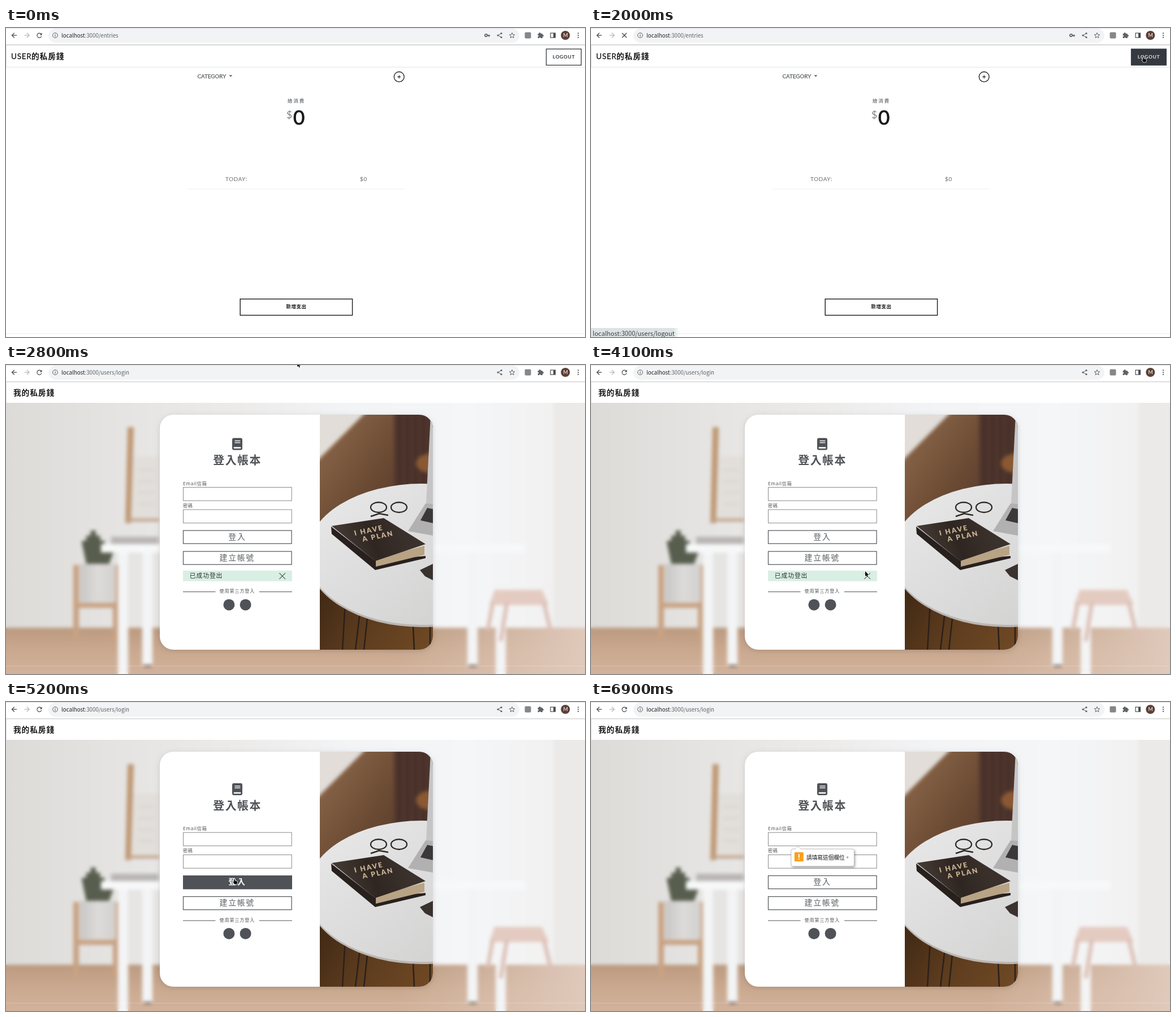
An HTML page with a canvas that plays this animation: 1024x547 px, repeating every 7 s.

```html
<!DOCTYPE html>
<html lang="zh-Hant">
<head>
<meta charset="utf-8">
<title>私房錢</title>
<style>
html, body { margin: 0; width: 100%; height: 100%; overflow: hidden; background: #fff; }
canvas { display: block; }
</style>
</head>
<body>
<canvas id="stage" width="1024" height="547"></canvas>
<script>
const W = 1024, H = 547, LOOP = 7000, TICK = 100;
const CJK = '"Noto Sans CJK TC", "Noto Sans CJK JP", "Noto Sans CJK", sans-serif';
const LATIN = 'Lato, ' + CJK;
const INK = '#4f5256', DARK = '#191919', ICON = '#5f6368';
const screen = document.getElementById('stage').getContext('2d');
let g = screen;

// ---------- drawing helpers ----------
function text(s, x, y, size, color, { w = 400, ls = 0, f = CJK, bold = 0 } = {}) {
  g.font = `${w} ${size}px ${f}`;
  g.letterSpacing = ls + 'px';
  g.fillStyle = color;
  g.fillText(s, x, y);
  if (bold) {
    g.strokeStyle = color;
    g.lineWidth = bold;
    g.strokeText(s, x, y);
  }
  return g.measureText(s).width;
}
function rect(x, y, w, h, c) { g.fillStyle = c; g.fillRect(x, y, w, h); }
function frame(x, y, w, h, c, lw = 1) { g.strokeStyle = c; g.lineWidth = lw; g.strokeRect(x, y, w, h); }
function round(x, y, w, h, r, c) {
  g.beginPath(); g.roundRect(x, y, w, h, r); g.fillStyle = c; g.fill();
}
function trace(pts) {
  g.beginPath();
  for (let i = 0; i < pts.length; i += 2) g.lineTo(pts[i], pts[i + 1]);
}
function poly(c, ...pts) { trace(pts); g.closePath(); g.fillStyle = c; g.fill(); }
function line(c, lw, ...pts) { trace(pts); g.strokeStyle = c; g.lineWidth = lw; g.stroke(); }
function cross(x, y, r, c, lw) {
  line(c, lw, x - r, y - r, x + r, y + r);
  line(c, lw, x - r, y + r, x + r, y - r);
}
function oval(x, y, rx, ry, c) {
  g.beginPath(); g.ellipse(x, y, rx, ry, 0, 0, 7); g.fillStyle = c; g.fill();
}
function ring(x, y, rx, ry, c, lw, from = 0, to = 7) {
  g.beginPath(); g.ellipse(x, y, rx, ry, 0, from, to); g.strokeStyle = c; g.lineWidth = lw; g.stroke();
}
function fade(x0, y0, x1, y1, ...stops) {
  const d = g.createLinearGradient(x0, y0, x1, y1);
  stops.forEach((c, i) => d.addColorStop(i / (stops.length - 1), c));
  return d;
}
function layer(paint) {
  const c = document.createElement('canvas');
  c.width = W; c.height = H;
  g = c.getContext('2d');
  paint();
  g = screen;
  return c;
}
// Sharp copy below keeps the blurred edges opaque.
function soften(pic, r) {
  return layer(() => {
    g.drawImage(pic, 0, 0);
    g.filter = `blur(${r}px)`;
    g.drawImage(pic, 0, 0);
  });
}

// ---------- photographs ----------
const WOOD = '#c8a283';

function table(x, w, legs) {
  rect(x, 317, w, 15, '#f7f8f9');
  for (const [lx, foot] of legs) {
    rect(lx, 332, 18, foot - 332, '#f3f4f5');
    rect(lx + 2, foot - 3, 15, 3, '#5d5049');
  }
}

const room = soften(layer(() => {
  rect(0, 0, W, H, fade(0, 0, W, 0, '#dcdbd8', '#e5e4e2', '#ecebea', '#f3f4f6', '#f5f6f8', '#f0efef'));
  rect(968, 50, 56, 440, '#eceae9');
  rect(0, 465, W, 82, fade(0, 465, 0, H, '#bb9a80', '#caa990', '#d2b29b'));
  rect(700, 465, 324, 82, fade(700, 0, W, 0, '#dfc9ba00', '#dfc9ba'));
  // easel
  rect(222, 162, 49, 112, '#e2dfdb');
  for (let y = 185; y < 260; y += 20) rect(234, y, 28, 1.5, '#cdc8c4');
  poly('#bf9874', 215, 110, 226, 110, 221, 280, 211, 280);
  rect(214, 272, 57, 5, '#bfa087');
  // plant on its stand
  for (let i = -3; i <= 3; i++) {
    line('#585e4e', 9, 162 + i * 5, 354, 162 + i * 8, 293 + 9 * Math.abs(i + 1));
  }
  for (const x of [119, 189]) rect(x, 354, 10, 135, WOOD);
  rect(120, 421, 78, 9, WOOD);
  rect(131, 352, 63, 68, fade(131, 0, 194, 0, '#c8c6c4', '#dddbd9', '#d3d1cf'));
  // desks
  rect(186, 304, 84, 14, '#b9b5b3');
  table(168, 108, [[198, 560], [241, 534]]);
  table(755, 163, [[816, 534], [866, 560]]);
  // stool
  poly('#e4cbc1', 864, 398, 948, 398, 960, 425, 855, 425);
  for (const [x, lean, foot] of [[861, -9, 470], [886, -11, 489], [951, 17, 490]]) {
    line('#dcc0b5', 7, x, 420, x + lean, foot);
  }
}), 3);

const deskBack = soften(layer(() => {
  rect(540, 70, 230, 450, fade(570, 130, 740, 250, '#866347', '#6b4a33', '#50362a'));
  poly('#e2ddd8', 540, 70, 650, 70, 540, 180);
  for (let x = 686; x < 770; x += 14) rect(x, 70, 14, 160, fade(x, 0, x + 14, 0, '#553a30', '#412c26'));
  oval(752, 174, 27, 17, '#8a5933');
  rect(540, 370, 230, 150, fade(555, 390, 740, 504, '#3f2814', '#5d3c1e', '#6e4824'));
}), 3);

const desk = layer(() => {
  g.beginPath(); g.roundRect(272, 88, 483, 416, 24); g.clip();
  g.beginPath(); g.rect(555, 88, 200, 416); g.clip();
  g.drawImage(deskBack, 0, 0);
  for (const [x, lean] of [[600, -5], [628, -10], [642, -9], [718, 4], [750, 0]]) {
    line('#2b211b', 2.5, x, 420, x + lean, 504);
  }
  oval(735, 338, 203, 126, '#bbb6b1');
  oval(735, 335, 203, 125, fade(560, 220, 740, 460, '#e8e8e8', '#dededf', '#d4d4d3'));
  // laptop
  poly('#c6c5c6', 751, 88, 755, 88, 755, 250, 743, 246);
  poly('#b2b1b2', 742, 245, 755, 246, 755, 302, 711, 294);
  poly('#3a3839', 745, 253, 755, 255, 755, 280, 733, 275);
  // glasses
  for (const x of [659, 695]) ring(x, 252, 14, 9, '#2d2926', 2.3);
  line('#2d2926', 2.5, 645, 268, 660, 263, 676, 266);
  // notebook: back cover, pages, front cover
  poly('#27201d', 575, 286, 652, 346, 742, 338, 742, 342, 653, 363, 576, 299);
  poly('#b8a384', 654, 343, 740, 320, 740, 336, 654, 357);
  poly(fade(590, 320, 700, 280, '#453a34', '#2f2622', '#3b312c'), 576, 285, 668, 271, 742, 317, 653, 347);
  g.setTransform(1, -0.2, 0.25, 1, 617, 302);
  text('I HAVE', 0, 0, 12, '#c9b492', { w: 900, f: LATIN, ls: 2 });
  text('A PLAN', 11, 13, 12, '#c9b492', { w: 900, f: LATIN, ls: 2 });
  g.resetTransform();
  poly('#3a322f', 732, 363, 755, 352, 755, 381, 741, 374);
});

// ---------- browser bar ----------
function arrow(x, dir, c) {
  line(c, 1.3, x - 4.3, 13, x + 4.3, 13);
  line(c, 1.3, x, 8.7, x + 4.3 * dir, 13, x, 17.3);
}
function star(x, y) {
  const pts = [];
  for (let i = 0; i < 10; i++) {
    const a = i * Math.PI / 5 - Math.PI / 2, r = i % 2 ? 2.2 : 5;
    pts.push(x + r * Math.cos(a), y + r * Math.sin(a));
  }
  trace(pts); g.closePath();
  g.strokeStyle = ICON; g.lineWidth = 1; g.stroke();
}
function bar(path, loading, key) {
  const c = '#4a4d51';
  rect(0, 0, W, 29, '#fff');
  rect(0, 0, W, 1, '#dfe1e5');
  rect(0, 28.7, W, 1.8, '#d9d9d9');
  round(75, 1, 833, 25, 12.5, '#f1f3f4');
  arrow(14.8, -1, c);
  arrow(36.8, 1, '#b6b8bb');
  if (loading) {
    cross(59, 13, 4, c, 1.4);
  } else {
    ring(59, 13.2, 4, 4, c, 1.3, 0.3, 5.6);
    poly(c, 63.6, 8.4, 63.6, 12.4, 59.6, 12.4);
  }
  ring(87, 13, 4.4, 4.4, ICON, 1);
  rect(86.5, 12.3, 1.1, 3.2, ICON); rect(86.5, 10.4, 1.1, 1.1, ICON);
  const host = text('localhost', 98, 17, 9.72, '#202124');
  text(':3000/' + path, 98 + host, 17, 9.72, ICON);
  if (key) {
    ring(849, 13, 2.1, 2.1, ICON, 1.8);
    rect(851, 12.1, 5, 1.8, ICON); rect(853.3, 13, 1.7, 2.6, ICON);
  }
  line(ICON, 1, 876, 9.5, 870, 13, 876, 16.5);
  for (const y of [9.5, 13, 16.5]) oval(y === 13 ? 870 : 876, y, 1.6, 1.6, ICON);
  star(895, 13.4);
  round(917.5, 7.5, 11, 11, 2, '#85878a');
  round(940.5, 10, 8.5, 8, 1, ICON);
  oval(944, 9.6, 1.7, 1.7, ICON); oval(949.3, 13.6, 1.7, 1.7, ICON);
  oval(940.7, 14, 1.3, 1.3, '#fff'); oval(944.3, 18, 1.3, 1.3, '#fff');
  frame(963, 9, 8.5, 8, c, 1.2); rect(968, 9, 3.5, 8, c);
  oval(989.3, 13, 8, 8, '#5d4037');
  text('M', 985.6, 16.3, 9, '#fff', { f: LATIN });
  for (const y of [9.3, 13, 16.7]) oval(1012, y, 1.1, 1.1, c);
}

// ---------- pages ----------
function entries(hover, status) {
  const grey = '#7b8084';
  rect(0, 0, W, H, '#fff');
  frame(0.5, 30.5, W, 38.8, '#e4e4e4');
  text('USER', 9, 55, 13.5, DARK, { f: LATIN, ls: 0.7, bold: 0.3 });
  text('的私房錢', 45, 55, 13.7, DARK, { w: 700, ls: 0.9 });
  g.globalAlpha = hover;
  rect(955, 37, 63, 29, '#343a40');
  g.globalAlpha = 1;
  frame(955.5, 37.2, 61.8, 28.6, '#343a40', 1.3);
  text('LOGOUT', 967, 54, 8.1, hover ? '#fff' : DARK, { f: LATIN, ls: 1, bold: 0.2 });
  text('CATEGORY', 338.5, 89, 9.8, '#55595c', { f: LATIN, bold: 0.25 });
  poly('#55595c', 394.5, 83.5, 400.3, 83.5, 397.4, 86.6);
  ring(695.2, 86.4, 8.9, 8.9, DARK, 1.3);
  rect(692.2, 85.9, 6, 1.1, DARK); rect(694.7, 83.4, 1.1, 6, DARK);
  text('總消費', 498, 131.5, 8.4, grey, { w: 700, ls: 2 });
  text('$', 496, 159.5, 17.5, grey, { f: LATIN });
  text('0', 508, 171, 35, DARK, { f: LATIN, bold: 0.9 });
  text('TODAY:', 388, 271, 9.8, grey, { f: LATIN, ls: 0.7, bold: 0.2 });
  text('$0', 626, 271, 9.8, grey, { f: LATIN, ls: 0.8, bold: 0.2 });
  rect(321, 284.5, 384, 1, '#f0f0f0');
  frame(414.2, 479.7, 198.4, 28.8, DARK, 1.4);
  text('新增支出', 495.3, 496.3, 8.5, DARK, { w: 700, ls: 0.6 });
  g.setLineDash([2, 1]);
  line('#e2e2e2', 1, 0, 541, W, 541);
  g.setLineDash([]);
  if (status) {
    rect(0, 531, 156, 16, fade(146, 0, 156, 0, '#dde3e5', '#dde3e500'));
    text('localhost:3000/users/logout', 3, 545.3, 11.1, '#3c4043');
  }
}

function button(s, x, y, on) {
  if (on) rect(313, y - 0.5, 193, 24.5, INK);
  else frame(313.5, y, 191.6, 23.2, INK, 1.2);
  text(s, x, y + 15.7, 13.9, on ? '#fff' : '#5d6064', { ls: 1.7, w: on ? 700 : 400 });
}

function tooltip() {
  g.save();
  g.shadowColor = '#0006'; g.shadowBlur = 4; g.shadowOffsetX = 1.5; g.shadowOffsetY = 2;
  round(354, 260.3, 111.3, 30.4, 3, '#fff');
  g.restore();
  g.strokeStyle = '#b9b9b9'; g.lineWidth = 0.8; g.stroke();
  poly('#fff', 360.5, 261, 366, 255.3, 371.5, 261);
  line('#b9b9b9', 0.8, 360.5, 260.4, 366, 255.2, 371.5, 260.4);
  round(359.8, 266, 16, 16.3, 1.5, '#f9a01b');
  rect(366.8, 269, 2, 6.5, '#fff'); rect(366.8, 277, 2, 2, '#fff');
  text('請填寫這個欄位。', 381, 279.3, 9.7, '#151515');
}

function login({ alert, hover, focus, tip }) {
  const up = alert ? 0 : 14.5;
  g.drawImage(room, 0, 0);
  rect(0, 532.5, W, 1, '#ffffff40');
  rect(0, 30, W, 37, '#fff');
  rect(0, 30, 1, 37, '#e4e4e4');
  text('我的私房錢', 13, 53.7, 13.8, DARK, { w: 700, ls: 0.8 });
  g.save();
  g.shadowColor = '#0002'; g.shadowBlur = 8; g.shadowOffsetY = 2;
  round(272, 88, 483, 416, 24, '#fff');
  g.restore();
  g.drawImage(desk, 0, 0);

  g.save();
  g.translate(0, up);
  round(400, 129.3, 18, 21.2, 3, INK);
  for (const y of [133.6, 136.8]) rect(404.5, y, 9.8, 1.4, '#fff');
  round(402.5, 145.2, 13, 2.6, 1.2, '#fff');
  text('登入帳本', 366.3, 176, 19.9, INK, { w: 700, ls: 1.5 });
  text('Email信箱', 313, 212.6, 8.1, INK, { ls: 0.7 });
  text('密碼', 313, 251.6, 8.1, INK, { ls: 0.7 });
  frame(313.5, 216.5, 191.7, 23.7, focus ? '#101010' : '#8a8a8a', focus ? 1.6 : 1);
  frame(313.5, 256, 191.7, 23.7, '#8a8a8a');
  button('登入', 393.3, 293, hover);
  button('建立帳號', 377.6, 330, false);
  g.restore();

  g.globalAlpha = alert;
  rect(313, 364, 193, 18.7, '#d9efe3');
  text('已成功登出', 324.8, 376.6, 10.8, '#2b2f31', { ls: 0.9 });
  cross(488.7, 373.6, 5.3, INK, 1.2);
  g.globalAlpha = 1;

  g.save();
  g.translate(0, -up);
  rect(313, 401, 57.5, 1, INK); rect(448, 401, 58, 1, INK);
  text('使用第三方登入', 377.6, 403.2, 8.1, INK, { ls: 0.85 });
  for (const x of [394.4, 423.6]) oval(x, 424.4, 10, 10, INK);
  g.restore();
  if (tip) tooltip();
}

// ---------- pointer ----------
const within = (t, a, b) => t >= a && t < b;
const ramp = (t, start, end) => Math.min(1, Math.max(0, (t - start) / (end - start)));

// Each move: start, number of ticks, end point, sag of the path.
const moves = [
  [400, 8, 887, 94, 115], [1200, 4, 974, 51], [2100, 5, 515, -6],
  [3300, 1, 514, 64], [3500, 3, 468, 354], [3900, 1, 379, 324], [4100, 1, 485, 365],
  [4900, 1, 400, 349], [5200, 1, 401, 313], [5600, 1, 193, 250],
  [6000, 1, 214, 194], [6300, 1, 133, 49], [6600, 1, 26, -3]
];

function place(t) {
  let x = -125, y = 60;
  for (const [start, ticks, ex, ey, sag = 0] of moves) {
    if (t < start) break;
    const p = ramp(t + TICK, start, start + ticks * TICK);
    x += (ex - x) * p;
    y += (ey - y) * p + sag * Math.sin(Math.PI * p);
  }
  return [x, y];
}

function pointer(t) {
  if (!within(t, 400, 6900)) return;
  const hand = within(t, 1400, 2100) || within(t, 4300, 4700) || within(t, 4900, 5600);
  g.save();
  g.translate(...place(t));
  g.lineJoin = 'round';
  trace(hand
    ? [2, 0.6, 3.4, 0.6, 3.8, 3.4, 7.2, 4.2, 8, 5.2, 7.4, 9.4, 3, 9.4, 0.4, 5.6, 1.4, 5, 2.2, 5.8]
    : [0, 0, 0, 9.2, 2, 7.4, 3.4, 10.4, 4.9, 9.7, 3.6, 6.8, 6.4, 6.7]);
  g.closePath();
  g.strokeStyle = '#fff'; g.lineWidth = 1.5; g.stroke();
  g.fillStyle = '#000'; g.fill();
  g.restore();
}

// ---------- timeline ----------
function draw(now) {
  const t = Math.floor((now % LOOP) / TICK) * TICK;
  if (t < 2800) {
    entries(ramp(t, 1300, 1500) - ramp(t, 2000, 2200), within(t, 1700, 2500));
  } else {
    login({
      alert: 1 - ramp(t, 4400, 4700),
      hover: within(t, 5200, 6000),
      focus: within(t, 5600, 6900),
      tip: t >= 5600
    });
  }
  bar(t < 2700 ? 'entries' : 'users/login', within(t, 1800, 2700), t < 2700);
  pointer(t);
  requestAnimationFrame(draw);
}
requestAnimationFrame(draw);
</script>
</body>
</html>
```
